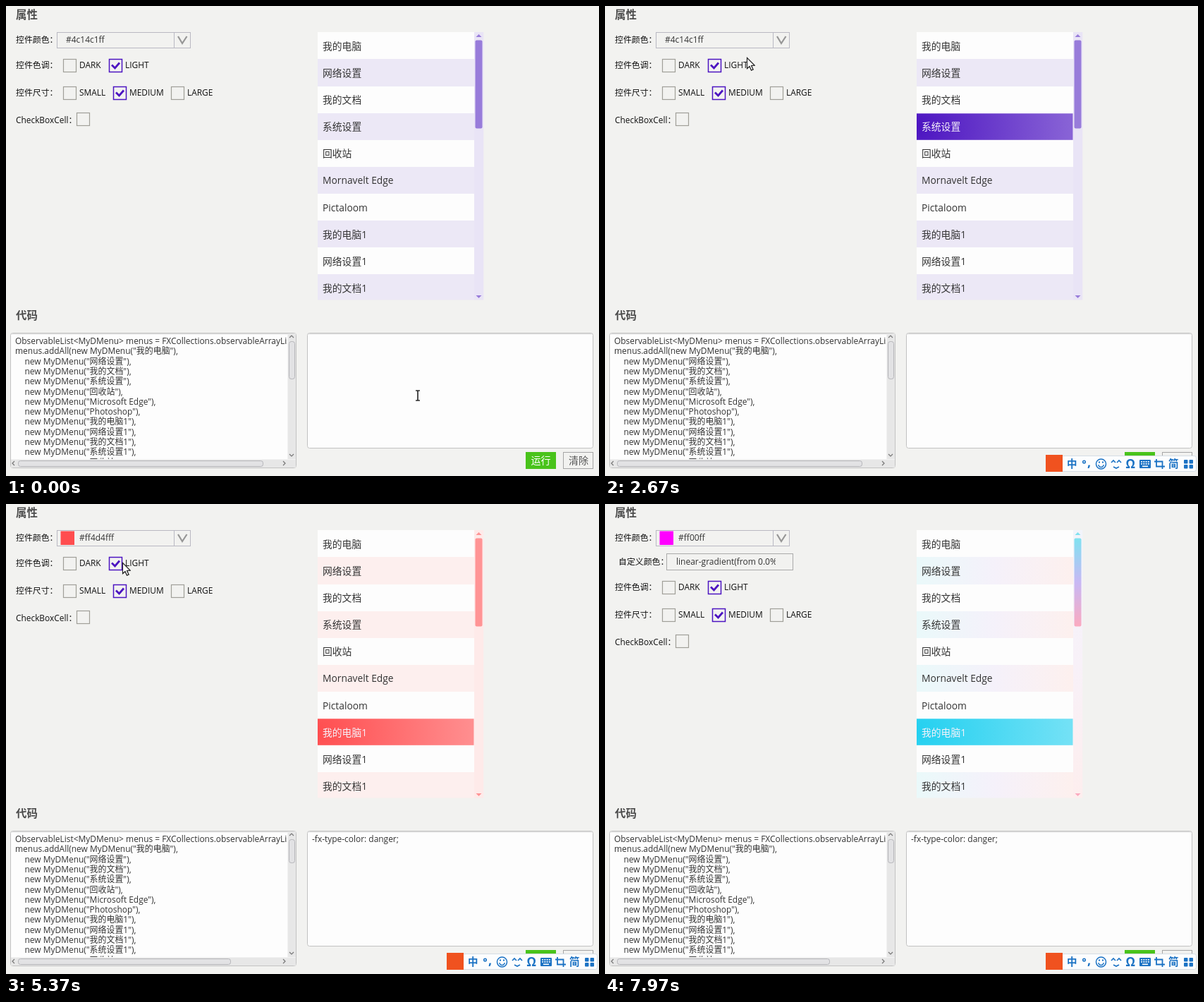
An HTML page with a canvas for the animation above (8 s loop, 841 by 666 pixels).

```html
<!DOCTYPE html>
<html lang="zh">
<head>
<meta charset="utf-8">
<style>
html, body { margin: 0; width: 100%; height: 100%; overflow: hidden; background: #f2f2f0; }
canvas { display: block; }
</style>
</head>
<body>
<canvas id="stage" width="841" height="666"></canvas>
<script>
const ctx = document.getElementById('stage').getContext('2d');
const LOOP = 8000;
const FONT = '"Open Sans", "Noto Sans CJK SC", "Noto Sans CJK", sans-serif';
const PURPLE = '#4c14c1', PALE = '#ece8f6';

// Moments at which the user acts
const SELECT = [[1950, 1], [2350, 3], [4700, 7]];
const PICK_RED = 3450, PICK_CUSTOM = 6720;
const POPUPS = [[2930, 4600], [5950, 7540]];
const HOVER = { from: 6880, to: 7250, row: 2 };

// time, x, y of the pointer
const POINTER = [
  [0, 584, 552], [120, 584, 552], [800, 320, 535], [1200, 130, 90], [1650, 480, 90],
  [1950, 495, 95], [2130, 520, 139], [2350, 480, 172], [2480, 470, 165], [2670, 201, 73],
  [2880, 250, 48], [3000, 250, 48], [3380, 150, 134], [3850, 150, 134], [4270, 482, 124],
  [4700, 490, 322], [5050, 470, 318], [5370, 165, 83], [5820, 250, 48], [6050, 250, 48],
  [6600, 150, 220], [6760, 150, 220], [7000, 478, 140], [7480, 478, 140], [7860, 235, 84], [8000, 235, 84]
];
// time, opacity of the far end of the highlighted list row
const FADE = [[0, .35], [1950, .35], [2130, .42], [2670, .66], [3850, .66], [4270, .42],
  [4700, .42], [5370, .63], [8000, .63]];

const MENU = ['我的电脑', '网络设置', '我的文档', '系统设置', '回收站', 'Mornavelt Edge', 'Pictaloom',
  '我的电脑1', '网络设置1', '我的文档1'];
const CODE_ITEMS = ['网络设置', '我的文档', '系统设置', '回收站', 'Microsoft Edge', 'Photoshop',
  '我的电脑1', '网络设置1', '我的文档1', '系统设置1', '回收站1'];
const CODE = ['ObservableList<MyDMenu> menus = FXCollections.observableArrayList();',
  'menus.addAll(new MyDMenu("我的电脑"),', ...CODE_ITEMS.map(name => `    new MyDMenu("${name}"),`)];
const COLORS = ['#4c14c1ff', '#585858ff', '#ff4d4fff', '#fc9e1bff', '#49c31bff', '#ff00ff'];

const THEMES = {
  purple: { base: [76, 20, 193], alt: [PALE], track: ['#e9e4f6'], thumb: ['#987cda'] },
  red: { base: [255, 77, 79], alt: ['#fdefee'], track: ['#feeae9'], thumb: ['#ff9495'] },
  rainbow: { base: [35, 208, 240], alt: ['#eaf9fa', '#f5f1fa', '#fdf0ee'],
    track: ['#f2f4fb', '#f8f1f8', '#fdeeee'], thumb: ['#80e2f0', '#c8b8f4', '#fbaabf'] }
};

function sample(keys, t) {
  let i = 1;
  while (i < keys.length - 1 && keys[i][0] < t) i++;
  const [a, b] = [keys[i - 1], keys[i]];
  let u = Math.min(1, Math.max(0, (t - a[0]) / (b[0] - a[0])));
  u = u * u * (3 - 2 * u);
  return a.slice(1).map((v, k) => v + (b[k + 1] - v) * u);
}

function rect(x, y, w, h, fill) {
  ctx.fillStyle = fill;
  ctx.fillRect(x, y, w, h);
}

function frame(x, y, w, h, color, width = 1) {
  ctx.strokeStyle = color;
  ctx.lineWidth = width;
  ctx.strokeRect(x, y, w, h);
}

function round(x, y, w, h, r, fill, stroke) {
  ctx.beginPath();
  ctx.roundRect(x, y, w, h, r);
  if (fill) { ctx.fillStyle = fill; ctx.fill(); }
  if (stroke) { ctx.strokeStyle = stroke; ctx.lineWidth = 1; ctx.stroke(); }
}

function text(str, x, cy, size = 11.9, color = '#111', weight = 400) {
  ctx.font = `${weight} ${size}px ${FONT}`;
  ctx.fillStyle = color;
  ctx.fillText(str, x, cy + size * .36);
}

function line(points, color, width, closed) {
  ctx.beginPath();
  points.forEach(([x, y]) => ctx.lineTo(x, y));
  if (closed) ctx.closePath();
  ctx.strokeStyle = color;
  ctx.lineWidth = width;
  ctx.stroke();
}

function triangle(x, y, dir, color) {
  ctx.beginPath();
  ctx.moveTo(x - 4, y - 2 * dir);
  ctx.lineTo(x + 4, y - 2 * dir);
  ctx.lineTo(x, y + 2 * dir);
  ctx.fillStyle = color;
  ctx.fill();
}

function ramp(stops, x0, y0, x1, y1) {
  if (stops.length === 1) return stops[0];
  const g = ctx.createLinearGradient(x0, y0, x1, y1);
  stops.forEach((c, i) => g.addColorStop(i / (stops.length - 1), c));
  return g;
}

function highlight(x, y, w, h, rgb, alpha) {
  const g = ctx.createRadialGradient(x, y + h / 2, 0, x, y + h / 2, w);
  g.addColorStop(0, `rgb(${rgb})`);
  g.addColorStop(1, `rgba(${rgb},${alpha})`);
  rect(x, y, w, h, '#fff');
  rect(x, y, w, h, g);
}

function checkBox(x, cy, label, checked) {
  const top = Math.round(cy - 9);
  frame(x + .5, top + .5, 18, 18, checked ? PURPLE : '#a09f98', checked ? 1.5 : 1.2);
  if (checked) line([[x + 4, top + 8.5], [x + 8.5, top + 13], [x + 15, top + 5.5]], PURPLE, 2.8);
  if (label) text(label, x + 23, cy);
}

function comboBox(color, open, t) {
  if (open) {
    ctx.save();
    ctx.shadowColor = '#a58be0';
    ctx.shadowBlur = 5;
    rect(71, 36, 168, 24, '#f4f4f4');
    ctx.restore();
  }
  frame(72.5, 37.5, 189, 22, '#b9b8c2');
  if (open) { rect(72, 37, 167, 22, '#f4f4f4'); frame(71.5, 36.5, 167, 23, '#8a76c6'); }
  else line([[238.5, 37], [238.5, 60]], '#b9b8c2', 1);
  line([[244, 43], [250, 53], [256.5, 43]], '#969696', 2.2);
  const plain = color === COLORS[0];
  if (!plain) rect(77.5, 38.5, 19.5, 19.5, color);
  text(color, plain ? 85 : 104, 48, 12, '#333');
  if (open && t < 5000 && !plain) rect(104, 41, 1, 14, '#333');
}

function properties(t, color, open) {
  const custom = t >= PICK_CUSTOM, dy = custom ? 33.7 : 0;
  text('属性', 14, 12, 15.4, '#4b4b4b', 700);
  text('代码', 14, 438, 15.4, '#4b4b4b', 700);
  text('控件颜色：', 14, 48);
  comboBox(color, open, t);
  if (custom) {
    text('自定义颜色：', 19, 82);
    frame(87.5, 70.5, 179, 23, '#aaa');
    ctx.save();
    ctx.beginPath();
    ctx.rect(88, 70, 154, 24);
    ctx.clip();
    text('linear-gradient(from 0.0%', 101, 82, 12, '#333');
    ctx.restore();
  }
  text('控件色调：', 14, 84 + dy);
  checkBox(81, 84 + dy, 'DARK');
  checkBox(146, 84 + dy, 'LIGHT', true);
  text('控件尺寸：', 14, 123 + dy);
  checkBox(81, 123 + dy, 'SMALL');
  checkBox(152, 123 + dy, 'MEDIUM', true);
  checkBox(234, 123 + dy, 'LARGE');
  text('CheckBoxCell：', 14, 162 + dy);
  checkBox(100, 160 + dy);
}

function list(t, theme) {
  const x = 442, w = 222, pitch = 38.1;
  const selected = SELECT.filter(([at]) => t >= at).map(s => s[1]).pop();
  ctx.save();
  ctx.beginPath();
  ctx.rect(x, 37, 235.5, 379.5);
  ctx.clip();
  MENU.forEach((name, i) => {
    const y = Math.round(37.3 + i * pitch);
    rect(x, y, w, 39, i % 2 ? ramp(theme.alt, x, 0, x + w, 0) : '#fdfdfd');
    let ink = '#333';
    if (i === selected) {
      highlight(x, y + .3, w - .5, 37.5, theme.base, sample(FADE, t)[0]);
      ink = '#f6f2fa';
    } else if (i === HOVER.row && t >= HOVER.from && t < HOVER.to) {
      ink = ramp(['#45c4dc', '#b69aec', '#f0808e'], 449, 0, 504, 0);
    }
    text(name, 449, 57 + i * pitch, 13.8, ink);
  });
  rect(664, 37, 13.5, 380, ramp(theme.track, 0, 37, 0, 417));
  round(665.5, 48.5, 10, 125, 2, ramp(theme.thumb, 0, 48, 0, 174));
  triangle(670.5, 42, -1, theme.thumb[0]);
  triangle(670.5, 412, 1, theme.thumb.at(-1));
  ctx.restore();
}

function popup(t, color) {
  const span = POPUPS.find(([from, to]) => t >= from && t < to);
  if (!span) return;
  const wide = t >= PICK_CUSTOM, pitch = 28.6;
  const full = wide ? 183 : 173;
  const h = full * Math.min(1, (t - span[0]) / 200, (span[1] - t) / 150);
  ctx.save();
  ctx.shadowColor = 'rgba(0,0,0,.16)';
  ctx.shadowBlur = 24;
  ctx.shadowOffsetY = 3;
  rect(71, 62, 202.5, h, '#fdfdfd');
  ctx.restore();
  ctx.save();
  ctx.beginPath();
  ctx.rect(71, 62, 202.5, h);
  ctx.clip();
  const w = wide ? 201 : 188;
  COLORS.forEach((name, i) => {
    const cy = 77 + i * pitch, top = Math.round(cy - 14.3);
    if (i % 2) rect(72, top, w, 28.5, PALE);
    if (name === color) highlight(72, top, w, 28, THEMES.purple.base, wide ? .62 : .5);
    rect(79.3, cy - 7, 14.5, 14.5, name);
    text(name, 98, cy, 13.7, name === color ? '#f6f2fa' : '#333');
  });
  if (!wide) {
    rect(260, 62, 14, full, '#ebe6f7');
    round(262, 74, 10, 147, 3, '#987cda');
    triangle(267, 67, -1, '#987cda');
    triangle(267, 228, 1, '#987cda');
  }
  ctx.restore();
}

function panel(x, y, w, h) {
  round(x + .5, y + .5, w - 1, h - 1, 3, '#fdfdfd', '#c2c2c2');
  rect(x + 2, y + 1, w - 4, 1, '#dedede');
  rect(x + 2, y + 2, w - 4, 1, '#f2f2f2');
}

function editors(changed) {
  panel(6, 463, 406, 192);
  ctx.save();
  ctx.beginPath();
  ctx.rect(7, 465, 392, 177);
  ctx.clip();
  CODE.forEach((row, i) => {
    const indent = row.startsWith(' ') ? 13.5 : 0;
    text(row.trim(), 13 + indent, 474.7 + i * 14.3, 11.95, '#333');
  });
  ctx.restore();
  rect(399.5, 464, 11.5, 178, '#e7e7e7');
  rect(7, 642.5, 404, 11.5, '#e7e7e7');
  round(401.5, 475.5, 8, changed ? 33 : 53, 3, '#e2e2e4', '#b4b4b8');
  round(17.5, 644.5, changed ? 301 : 347, 8, 3, '#e2e2e4', '#b4b4b8');
  line([[402, 470], [405, 467], [408, 470]], '#777', 1.2);
  line([[402, 635], [405, 638], [408, 635]], '#777', 1.2);
  line([[12, 645], [9, 648], [12, 651]], '#777', 1.2);
  line([[393, 645], [396, 648], [393, 651]], '#777', 1.2);

  panel(427, 463, 406, 164);
  if (changed) text('-fx-type-color: danger;', 434, 474.7, 11.95, '#333');
  rect(737, 632, 43, 24, '#49c31b');
  text('运行', 744.5, 644, 14, '#fff');
  frame(790.5, 632.5, 42, 23, '#a5a5a5');
  text('清除', 798, 644, 14, '#555');
}

function inputBar() {
  const blue = '#1b72c4';
  round(640.5, 637.5, 198, 22, 3, '#fcfdfe', '#d5dde5');
  rect(625, 636, 24, 24, '#f0521f');
  text('中', 655, 648.5, 14.5, blue, 700);
  ctx.strokeStyle = blue;
  ctx.lineWidth = 1.5;
  const arc = (x, y, r, from = 0, to = 7) => {
    ctx.beginPath();
    ctx.arc(x, y, r, from, to);
    ctx.stroke();
  };
  arc(679.5, 646, 1.8);
  text(',', 684, 647, 18, blue, 700);
  ctx.lineWidth = 1.5;
  arc(703.5, 649, 7);
  arc(703.5, 650, 3.5, 0, Math.PI);
  rect(700, 645.5, 2, 2, blue);
  rect(705, 645.5, 2, 2, blue);
  line([[718, 647], [721, 644], [724, 647]], blue, 1.6);
  line([[726, 647], [729, 644], [732, 647]], blue, 1.6);
  line([[721, 653], [725, 655], [729, 653]], blue, 1.6);
  text('Ω', 738.5, 649, 17, blue, 700);
  round(758, 643, 16, 12, 1, blue);
  for (let i = 0; i < 8; i++) rect(760 + i % 4 * 3.3, 645 + (i >> 2) * 3, 2, 1.6, '#fff');
  rect(762, 651.5, 8, 1.6, '#fff');
  line([[782, 642], [782, 652.5], [794, 652.5]], blue, 1.8);
  line([[779, 645.5], [790.5, 645.5], [790.5, 656]], blue, 1.8);
  text('简', 799, 648.5, 14.5, blue, 700);
  [[821, 643], [828.5, 643], [821, 650], [828.5, 650]].forEach(([x, y]) => round(x, y, 5.5, 5.5, 1, blue));
}

function pointer(t) {
  if (t > 7840) return;
  const [x, y] = sample(POINTER, t);
  if (y > 463 && y < 640) {
    line([[x - 3, y - 7], [x + 3, y - 7]], '#111', 1.3);
    line([[x, y - 7], [x, y + 7]], '#111', 1.5);
    line([[x - 3, y + 7], [x + 3, y + 7]], '#111', 1.3);
    return;
  }
  const shape = [[0, 0], [0, 15], [3.5, 12], [6, 17.5], [8.5, 16.5], [6, 11], [10.5, 10.5]];
  line(shape.map(([dx, dy]) => [x + dx + .5, y + dy + .5]), '#222', 1.1, true);
  ctx.fillStyle = '#fff';
  ctx.fill();
  ctx.stroke();
}

function draw() {
  const t = performance.now() % LOOP;
  const red = t >= PICK_RED, custom = t >= PICK_CUSTOM;
  const color = COLORS[custom ? 5 : red ? 2 : 0];
  const open = POPUPS.some(([from, to]) => t >= from && t < to);
  rect(0, 0, 841, 666, '#f2f2f0');
  properties(t, color, open);
  list(t, custom ? THEMES.rainbow : red ? THEMES.red : THEMES.purple);
  editors(red);
  popup(t, color);
  if (t >= SELECT[0][0]) inputBar();
  pointer(t);
  requestAnimationFrame(draw);
}
draw();
</script>
</body>
</html>
```
